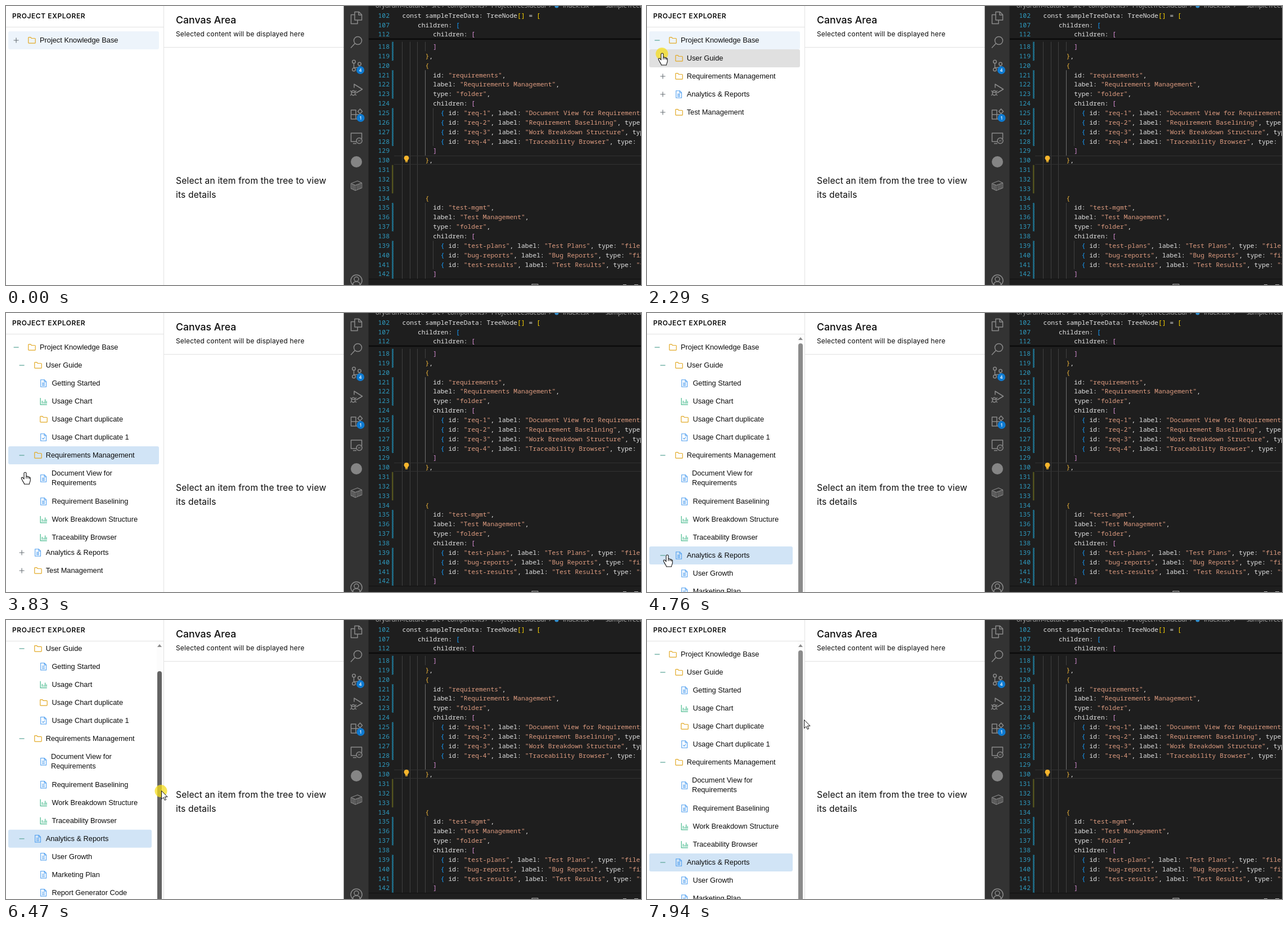
An HTML page for the animation above (7.99 s loop, 1129 by 496 pixels).

```html
<!DOCTYPE html>
<html lang="en">
<head>
<meta charset="utf-8">
<title>Project Explorer</title>
<style>
html, body { margin: 0; width: 100%; height: 100%; overflow: hidden; background: #fff; }
#static, #overlay { position: absolute; left: 0; top: 0; display: block; }
#overlay { pointer-events: none; }
.ui { font-family: Inter, sans-serif; fill: #0c0c0c; }
.code { font: 500 11.37px "Noto Sans Mono", monospace; fill: #e4e4e4; white-space: pre; }
.num { fill: #2f9bc0; text-anchor: end; }
.crumb { font: 11.2px "Open Sans", sans-serif; fill: #adadad; }
.bar { fill: none; stroke: #8a8a8a; stroke-width: 1.5; stroke-linejoin: round; }
.badge { font: 600 8px "Open Sans", sans-serif; fill: #fff; text-anchor: middle; }
#view { position: absolute; left: 0; top: 38px; width: 280px; height: 458px; overflow: hidden; }
#tree { position: absolute; left: 4px; top: 7px; width: 268px; }
.narrow #tree { width: 255px; }
.row { position: relative; height: 32px; border-radius: 3px; }
.row.tall { height: 49.5px; }
.row svg { position: absolute; top: 50%; width: 14px; height: 14px; margin-top: -7px; fill: none; }
.row .sign { left: calc(6.7px + 10.7px * var(--d)); }
.row .icon { left: calc(35px + 10.7px * var(--d)); }
.row span { position: absolute; left: calc(56px + 10.7px * var(--d)); top: 50%; transform: translateY(-50%);
  font: 12.8px/17.6px "Liberation Sans", Arial, sans-serif; color: #0c0c0c; white-space: nowrap; }
.tall span { margin-left: -.5px; }
.narrow .tall span { margin-left: -1.5px; }
.row.hover { background: #f5f5f5; }
.row.focus { background: #e0e0e0; }
.row.sel { background: #edf4fb; }
.row.sel.hover { background: #e3eefa; }
.row.sel.focus { background: #d1e4f6; }
.kids { overflow: hidden; }
#scroll { position: absolute; left: 268px; top: 0; width: 12px; height: 458px; background: #fcfcfc; display: none; }
.narrow #scroll { display: block; }
#scroll i { position: absolute; left: .7px; top: 5px; border: 4.3px solid transparent; border-top: 0; border-bottom: 5px solid #8b8b8b; }
#thumb { position: absolute; left: 1px; top: 16px; width: 8px; height: 600px; border-radius: 4px; background: #8b8b8b; }
</style>
</head>
<body>
<svg id="static" width="1129" height="496">
  <defs>
    <pattern id="hatch" width="3" height="3" patternUnits="userSpaceOnUse">
      <path d="M-1 1L1 -1M0 3L3 0M2 4L4 2" stroke="#1f8fb5" stroke-width="1.3"/>
    </pattern>
    <symbol id="folder" viewBox="0 0 14 14"><path d="M.8 11.2V2.6q0-.9.9-.9h3.1l1.5 1.8h5.9q1 0 1 1v6.7q0 1-1 1H1.8q-1 0-1-1z" stroke="#e2a925" stroke-width="1.2"/></symbol>
    <symbol id="doc" viewBox="0 0 14 14"><path d="M1.7.7h6.6l3.2 3.2v9.4H1.7zM8 .9v3.3h3.3M4 6.2h5M4 8.4h5M4 10.6h5" stroke="#4f9ff0" stroke-width="1.1"/></symbol>
    <symbol id="check" viewBox="0 0 14 14"><path d="M1.7.7h6.6l3.2 3.2v9.4H1.7zM8 .9v3.3h3.3M4.3 8.4l1.7 1.8 3-3.3" stroke="#4f9ff0" stroke-width="1.1"/></symbol>
    <symbol id="chart" viewBox="0 0 14 14"><path d="M1.2 1v11.8h11.6M4.4 11V6M7.2 11V7.8M9.6 11V3.6M12 11V6.6" stroke="#45b98c" stroke-width="1.2"/></symbol>
    <symbol id="plus" viewBox="0 0 14 14"><path d="M2.6 7h9M7.1 2.5v9" stroke="#686f75" stroke-width="1.1"/></symbol>
    <symbol id="minus" viewBox="0 0 14 14"><path d="M2.6 7h9" stroke="#62a99c" stroke-width="1.3"/></symbol>
  </defs>
  <path d="M0 37.5H280M280.5 0V496M281 73.5H601" stroke="#e2e2e2" fill="none"/>
  <g class="ui">
    <text x="11" y="22" font-size="12" font-weight="600" letter-spacing=".57">PROJECT EXPLORER</text>
    <text x="302" y="31" font-size="17.7" font-weight="500">Canvas Area</text>
    <text x="302" y="54" font-size="12" letter-spacing=".17">Selected content will be displayed here</text>
    <g font-size="15.65" letter-spacing=".15"><text x="302" y="316">Select an item from the tree to view</text><text x="302" y="341">its details</text></g>
  </g>
  <rect x="601" width="528" height="496" fill="#1e1e1e"/>
  <rect x="600.500" width="44" height="496" fill="#333"/>
  <g class="bar">
    <path transform="translate(623 21)" d="M-3-10.500h7.500l5 5v9.500H-3zM4-10.300v5.300h5.300M-3-5.500h-6.500v16h11.500V4.500"/>
    <g transform="translate(623 64)"><circle cx="2.500" cy="-2.500" r="7"/><path d="M-2.600 2.600L-10 10.500"/></g>
    <g transform="translate(623 106)"><circle cx="-4.500" cy="-7" r="2.800"/><circle cx="-4.500" cy="7" r="2.800"/><circle cx="5.500" cy="-3" r="2.800"/><path d="M-4.500-4.200V4.200M5.500-.2q0 3.700-5 3.700h-2.500q-2.500 0-2.500 1"/></g>
    <g transform="translate(623 149)"><path d="M-4-3.500V-10L10.500-1L-.5 5.500"/><ellipse cx="-5.500" cy="5.500" rx="3.400" ry="4.300"/><path d="M-9 4.500H-2M-11 1.500l2.500 2M0 1.500l-2.500 2M-11 10l2.500-2M0 10l-2.500-2"/></g>
    <path transform="translate(623 192)" d="M-9.500-7h8.500v16h-8.500zM-9.500 1H7.500v8H-1M2.500-4.500l4-4.500 4 4.500-4 4z"/>
    <g transform="translate(623 235)"><path d="M0 6h-9.500V-9h19V1M-6 9.500h6"/><circle cx="5" cy="4.500" r="5"/><path d="M3 3l1.800 1.700L3 6.400M7.200 2.600L5.600 4.300l1.600 1.700" stroke-width="1"/></g>
    <circle cx="623" cy="277" r="10" fill="#858585" stroke="none"/>
    <path transform="translate(623 319.500)" stroke-width="1.200" d="M-9.500-4L2-8.500l7.500 3.500v9L-2 8.500l-7.500-3.500zM-9.500-4L-2-.8 9.500-5M-2-.8V8.500M1.200-1.500v8M4-2.500v8M6.700-3.500v8M-7-2.500v8M-4.500-1.500v8"/>
    <g transform="translate(623 488)"><circle r="10"/><circle cy="-2.500" r="4"/><path d="M-6.500 8q0-6 6.500-6t6.500 6"/></g>
  </g>
  <g fill="#0e7ad1"><circle cx="630" cy="114" r="7"/><circle cx="630.500" cy="199" r="7"/></g>
  <text class="badge" x="630" y="117">4</text><text class="badge" x="630.500" y="202">1</text>
  <g class="crumb">
    <text x="657" y="3">orydrum-feature</text><text x="746" y="3">›</text><text x="757" y="3">src</text><text x="775" y="3">›</text>
    <text x="785" y="3">components</text><text x="852" y="3">›</text><text x="863" y="3">ProjectTreeSideBar</text><text x="965" y="3">›</text>
    <text x="990" y="3">index.tsx</text><text x="1043" y="3">›</text><text x="1066" y="3">sampleTreeData</text>
  </g>
  <circle cx="979" cy="0" r="3.500" fill="#2f8fd0"/>
  <g id="editor"></g>
  <path d="M690 266.500H1129M690 281.500H1129" stroke="#323232"/>
  <path d="M712 266a4.300 4.300 0 0 1 2.300 8v2.500h-4.600V274a4.300 4.300 0 0 1 2.300-8z" fill="#f6b52c"/><path d="M710 277.500h4" stroke="#c9952b"/>
  <rect x="645" y="57.500" width="484" height="2.500" fill="#0b0b0b"/>
  <path d="M645 485.500H1129" stroke="#111"/>
  <path d="M935 494.500h11v2M935 494v2M1097 495.500h6M1117 495.500h7" stroke="#b5b5b5" fill="none"/>
</svg>
<div id="view">
  <div id="tree"></div>
  <div id="scroll"><i></i><div id="thumb"></div></div>
</div>
<svg id="overlay" width="1129" height="496">
  <circle id="halo" r="11" fill="#f5de1e" fill-opacity=".75"/>
  <g id="hand" stroke="#111" stroke-width="1.100" stroke-linejoin="round">
    <path fill="#fff" d="M-2 2a2 2 0 0 1 4 0v5.500a1.800 1.800 0 0 1 3 .6a1.700 1.700 0 0 1 2.600.8a1.500 1.500 0 0 1 1.700 1.500V14c0 2.800-1.800 4-1.800 7H-1.500c0-2.300-2-3.500-3-6L-6.600 11c-.7-1.600 1.400-2.800 2.600-1.400L-2 12z"/>
    <path d="M2 7.500V11M5 8.200V11M7.600 9v2.500" fill="none"/>
  </g>
  <path id="arrow" fill="#fff" stroke="#111" d="M.5.500V15.500L4 12.300L6.300 17.300L8.600 16.300L6.300 11.300H11z"/>
  <path id="beam" fill="none" stroke="#ddd" d="M-3-8h2l1 1 1-1h2M0-7V7M-3 8h2l1-1 1 1h2"/>
</svg>
<script>
const LOOP = 7990, $ = id => document.getElementById(id);

// Editor
const CHAR = 6.823, LEFT = 704.6;
const bracket = { 0: '#ffd700', 4: '#179fff', 6: '#f0b63a', 8: '#da8fd6', 10: '#179fff' };
const item = (id, label, type) => `{ id: "${id}", label: "${label}", type: "${type}" },`;
const lines = [
  [118, 8, ']'], [119, 6, '},'], [120, 6, '{'],
  [121, 8, 'id: "requirements",'], [122, 8, 'label: "Requirements Management",'],
  [123, 8, 'type: "folder",'], [124, 8, 'children: ['],
  [125, 10, item('req-1', 'Document View for Requirements', 'file')],
  [126, 10, item('req-2', 'Requirement Baselining', 'file')],
  [127, 10, item('req-3', 'Work Breakdown Structure', 'chart')],
  [128, 10, item('req-4', 'Traceability Browser', 'chart')],
  [129, 8, ']'], [130, 6, '},'], [131, 0, ''], [132, 0, ''], [133, 0, ''], [134, 6, '{'],
  [135, 8, 'id: "test-mgmt",'], [136, 8, 'label: "Test Management",'],
  [137, 8, 'type: "folder",'], [138, 8, 'children: ['],
  [139, 10, item('test-plans', 'Test Plans', 'file')],
  [140, 10, item('bug-reports', 'Bug Reports', 'file')],
  [141, 10, item('test-results', 'Test Results', 'file')],
  [142, 8, ']']
];
const lineY = n => 72 + 16.85 * (n - 118);
const paint = (text, indent) => text.replace(/"[^"]*"|[\[\]{}]+/g, s =>
  `<tspan fill="${s[0] === '"' ? '#de9c80' : bracket[indent]}">${s}</tspan>`);
const codeLine = (n, indent, text, y) =>
  `<text class="code num" x="682" y="${Math.round(y + 4)}">${n}</text>` +
  `<text class="code" x="${LEFT + indent * CHAR}" y="${Math.round(y + 4)}">${paint(text, indent)}</text>`;
const guide = (col, from, to, color = '#404040') =>
  `<path d="M${Math.floor(LEFT + col * CHAR) + .5} ${Math.max(60, lineY(from) - 8.4)}V${lineY(to) + 8.4}" stroke="${color}"/>`;
const gutter = (from, to, fill, w) => {
  const y = Math.max(60, lineY(from) - 8.4);
  return `<rect x="686" y="${y}" width="${w}" height="${lineY(to) + 8.4 - y}" fill="${fill}"/>`;
};
$('editor').innerHTML =
  [0, 2, 4].map(c => guide(c, 118, 142)).join('') +
  guide(6, 118, 118) + guide(6, 121, 129, '#707070') + guide(6, 135, 142) +
  guide(8, 125, 128) + guide(8, 139, 141) +
  [[118, 119], [121, 123], [125, 128], [135, 137], [139, 142]].map(r => gutter(...r, 'url(#hatch)', 3)).join('') +
  gutter(131, 133, '#53531f', 2.5) +
  codeLine(102, 0, 'const sampleTreeData: TreeNode[] = [', 16.5) +
  codeLine(107, 4, 'children: [', 33.5) +
  codeLine(112, 8, 'children: [', 50.3) +
  lines.map(l => codeLine(...l, lineY(l[0]))).join('');

// Tree: [label, icon, children, press time, release time]
const data = ['Project Knowledge Base', 'folder', [
  ['User Guide', 'folder', [
    ['Getting Started', 'doc'], ['Usage Chart', 'chart'],
    ['Usage Chart duplicate', 'folder'], ['Usage Chart duplicate 1', 'check']
  ], 2290, 2430],
  ['Requirements Management', 'folder', [
    ['Document View for<br>Requirements', 'doc'], ['Requirement Baselining', 'doc'],
    ['Work Breakdown Structure', 'chart'], ['Traceability Browser', 'chart']
  ], 3430, 3594],
  ['Analytics &amp; Reports', 'doc', [
    ['User Growth', 'doc'], ['Marketing Plan', 'doc'], ['Report Generator Code', 'doc']
  ], 4280, 4430],
  ['Test Management', 'folder', []]
], 1280, 1420];

const nodes = [];
function build([label, icon, kids, down = Infinity, up = Infinity], depth, parent) {
  const row = document.createElement('div');
  const tall = label.includes('<br>');
  row.className = 'row';
  row.style.setProperty('--d', depth);
  row.innerHTML = (kids ? '<svg class="sign"><use/></svg>' : '') +
    `<svg class="icon"><use href="#${icon}"/></svg><span>${label}</span>`;
  parent.append(row);
  const node = { row, tall, down, up, kids: [], sign: row.querySelector('.sign use') };
  nodes.push(node);
  if (kids) {
    node.box = document.createElement('div');
    node.box.className = 'kids';
    parent.append(node.box);
    node.kids = kids.map(k => build(k, depth + 1, node.box));
  }
  return node;
}
const root = build(data, 0, $('tree'));
const clicks = nodes.filter(n => n.up < Infinity);
const analytics = clicks[3];

// cubic-bezier(.4, 0, .2, 1)
function ease(x) {
  if (x <= 0) return 0;
  if (x >= 1) return 1;
  let a = 0, b = 1, u;
  for (let i = 0; i < 20; i++) {
    u = (a + b) / 2;
    const v = 1 - u;
    if (1.2 * u * v * v + .6 * u * u * v + u * u * u < x) a = u; else b = u;
  }
  return 3 * u * u * (1 - u) + u * u * u;
}
const openness = (n, t) => ease((t - n.up) / 300);

// Lays out a branch and returns its height.
function layout(n, top, t) {
  n.top = top;
  n.height = n.tall ? 49.5 : 32;
  if (!n.box) return n.height;
  let sum = 0;
  for (const k of n.kids) sum += layout(k, top + n.height + sum, t);
  const shown = sum * openness(n, t);
  n.box.style.height = shown + 'px';
  return n.height + shown;
}

// Pointer path: time, x, y
const path = [
  [420, 700, 430], [1210, 17, 57], [1730, 18, 62], [1940, 18, 62], [2080, 27, 84],
  [2600, 27, 84], [2880, 27, 195], [3220, 28, 246], [3600, 28, 246], [3830, 34, 283],
  [4220, 36, 430], [5100, 36, 430], [5550, 234, 229], [5730, 272, 266], [6200, 272, 266],
  [6470, 276, 303], [6600, 276, 316], [6940, 268, 188], [7190, 268, 188], [7460, 279, 177]
];
const slope = (i, k) => (path[i + 1][k] - path[i][k]) / (path[i + 1][0] - path[i][0]);
function tangent(i, k) {
  if (i === 0 || i === path.length - 1) return 0;
  const a = slope(i - 1, k), b = slope(i, k);
  return a * b <= 0 ? 0 : 2 * a * b / (a + b);
}
function along(t, k) {
  const last = path.length - 1;
  if (t >= path[last][0]) return path[last][k];
  let i = 0;
  while (i < last - 1 && t >= path[i + 1][0]) i++;
  const [t0] = path[i], h = path[i + 1][0] - t0, u = Math.max(0, (t - t0) / h), v = 1 - u;
  return path[i][k] * (1 + 2 * u) * v * v + path[i + 1][k] * u * u * (3 - 2 * u) +
    h * u * v * (tangent(i, k) * v - tangent(i + 1, k) * u);
}

const DRAG = [6200, 7000], GRAB = 266;
const within = (t, a, b) => t >= a && t < b;

function render(t) {
  const x = along(t, 1), y = along(t, 2);
  const dragging = within(t, ...DRAG);
  const shift = dragging ? Math.max(0, y - GRAB) : 0;
  const scroll = shift * 1.135;
  const narrow = openness(analytics, t) > .15;
  const moving = clicks.some(n => within(t, n.up, n.up + 300));
  const selected = clicks.filter(n => t >= n.up).pop() || root;
  const focused = clicks.filter(n => t >= n.down).pop();

  layout(root, 45 - scroll, t);
  $('view').className = narrow ? 'narrow' : '';
  $('tree').style.transform = `translateY(${-scroll}px)`;
  $('thumb').style.transform = `translateY(${shift}px)`;
  const overThumb = narrow && within(x, 266, 279) && t > 5600;
  $('thumb').style.background = dragging ? '#636363' : overThumb ? '#757575' : '#8b8b8b';

  const onRows = within(x, 4, narrow ? 259 : 272) && y > 45;
  for (const n of nodes) {
    const hover = t > 420 && onRows && !moving && within(y, n.top, n.top + n.height);
    n.row.className = 'row' + (n.tall ? ' tall' : '') + (hover ? ' hover' : '') +
      (n === focused ? ' focus' : '') + (n === selected ? ' sel' : '');
    if (n.sign) n.sign.setAttribute('href', t >= n.up ? '#minus' : '#plus');
  }

  const shape = t < 420 ? '' : x > 644 ? 'beam' : onRows ? 'hand' : 'arrow';
  for (const id of ['beam', 'hand', 'arrow']) {
    $(id).style.display = id === shape ? '' : 'none';
    $(id).setAttribute('transform', `translate(${x} ${y})`);
  }
  $('halo').style.display = dragging || clicks.some(n => within(t, n.down, n.up)) ? '' : 'none';
  $('halo').setAttribute('transform', `translate(${x - .5} ${y + 1})`);
}

const start = performance.now();
function tick() {
  render((performance.now() - start) % LOOP);
  requestAnimationFrame(tick);
}
tick();
</script>
</body>
</html>
```
